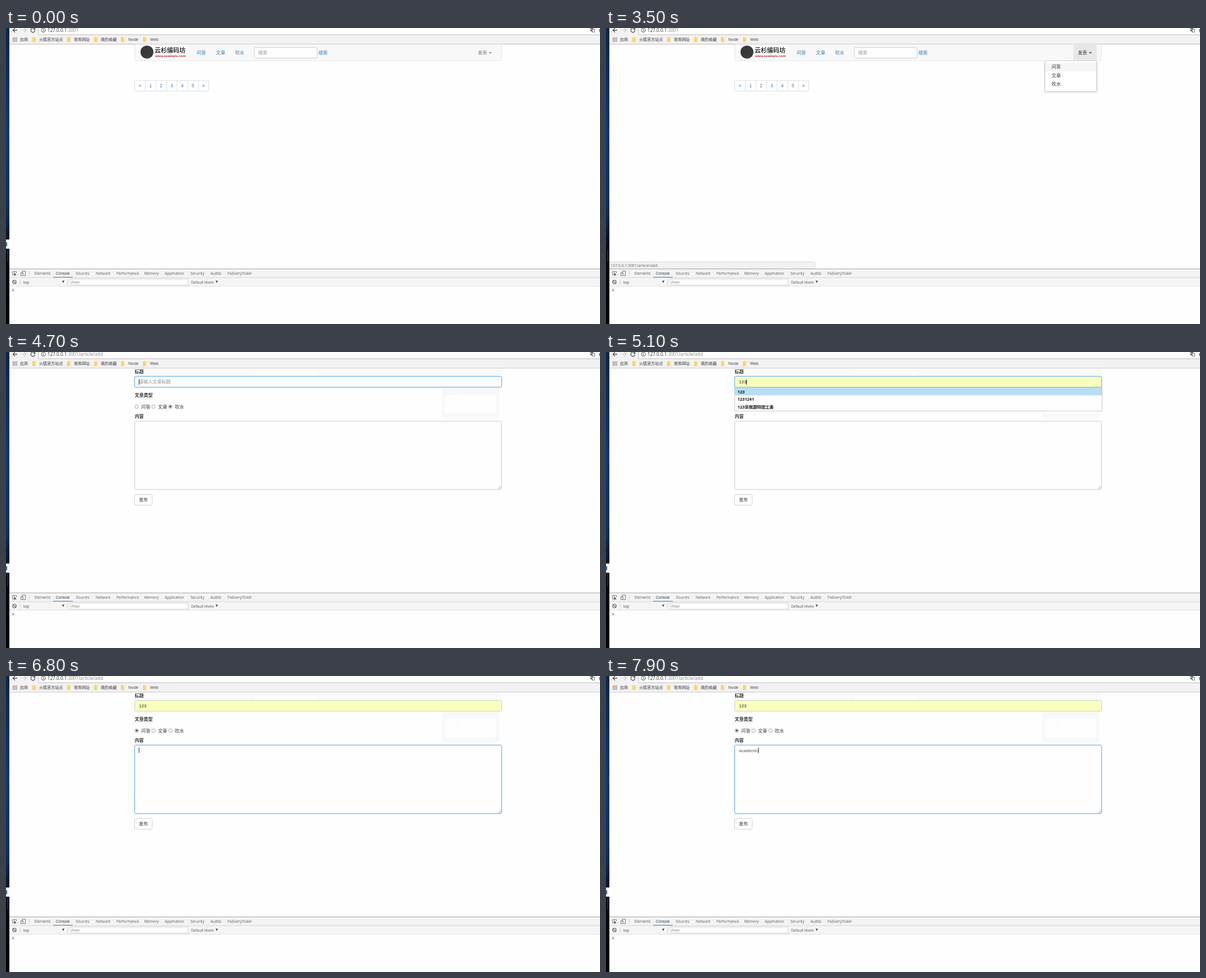
Recreate the animation shown at these times as an HTML page. Size 1059 by 529 pixels, loop 8000 ms.

```html
<!DOCTYPE html>
<html lang="zh">
<head>
<meta charset="utf-8">
<title>Article form</title>
<style>
html, body { margin: 0; width: 100%; height: 100%; overflow: hidden; background: #fefefe; }
svg { display: block; width: 1059px; height: 529px; }
text { white-space: pre; }
.ui { font-family: "Open Sans", "Noto Sans CJK SC", sans-serif; }
.pg { font-family: "Liberation Sans", "Noto Sans CJK SC", sans-serif; }
</style>
</head>
<body>
<svg id="stage" viewBox="0 0 1059 529" xmlns="http://www.w3.org/2000/svg"></svg>
<script>
const LOOP = 8000;
const LINK = '#337ab7', INK = '#333', FOCUS = '#66afe9';

const rect = (x, y, w, h, fill, more = '') =>
  `<rect x="${x}" y="${y}" width="${w}" height="${h}" fill="${fill}" ${more}/>`;
const box = (x, y, w, h, fill, stroke, r = 2, id = '') =>
  rect(x, y, w, h, fill, `stroke="${stroke}" rx="${r}" ${id && `id="${id}"`}`);
const path = (d, stroke, more = '') =>
  `<path d="${d}" fill="none" stroke="${stroke}" ${more}/>`;
const shape = (d, fill) => `<path d="${d}" fill="${fill}"/>`;
const group = (id, body) => `<g id="${id}">${body}</g>`;

// Text placed by its left edge and its middle line
function label(cls, x, mid, str, size, fill, more = '') {
  return `<text class="${cls}" x="${x}" y="${(mid + size * 0.36).toFixed(2)}" font-size="${size}" fill="${fill}" ${more}>${str}</text>`;
}
const ui = (...a) => label('ui', ...a);
const pg = (...a) => label('pg', ...a);
const BOLD = 'font-weight="700"';

function desktop() {
  return `<defs><linearGradient id="wall" x1="0" y1="0" x2="0" y2="1">
    <stop offset="0" stop-color="#04264f"/><stop offset=".35" stop-color="#063a78"/>
    <stop offset=".62" stop-color="#05305f"/><stop offset=".74" stop-color="#020a18"/>
    <stop offset="1" stop-color="#000"/></linearGradient></defs>` +
    rect(0, 0, 6, 529, 'url(#wall)') +
    rect(3, 396, 1, 22, '#4a4f58') +
    group('badge', rect(0, 378, 6, 16.5, '#f4f6f8') + rect(0, 383, 2, 7, '#3465a8'));
}

function browser() {
  const marks = [[47, 59, '火狐官方站点'], [109, 121, '常用网址'], [157, 169, '我的收藏'], [205, 218, 'Node'], [244, 257, 'Web']];
  const dots = ['#d9453d', '#4a8f4c', '#3b78e0'];
  let s = rect(6, 0, 1053, 29, '#f2f2f2') +
    rect(58, -4, 1010, 16, '#fff', 'stroke="#b9b9b9" rx="1.5"') +
    path('M20 4H12.5M16 .3L12.3 4L16 7.7', '#555', 'stroke-width="1.3"') +
    path('M28.5 4H36M32.5 .3L36.2 4L32.5 7.7', '#ccc', 'stroke-width="1.2"') +
    path('M51 1.5A3.8 3.8 0 1 0 51.8 4.6', '#555', 'stroke-width="1.3"') +
    shape('M52.2 -.5V3.4H48.3Z', '#555') +
    `<circle cx="66.5" cy="4" r="3.6" fill="none" stroke="#555"/>` +
    rect(66, 3.2, 1, 3, '#555') + rect(66, 1.6, 1, 1, '#555') +
    `<text class="ui" x="74" y="6.9" font-size="8.15" fill="#333">127.0.0.1<tspan fill="#888">:3001<tspan id="route"></tspan></tspan></text>` +
    group('translate', rect(1042, 0, 5, 6, '#666') + rect(1045.5, 2.5, 4, 5, '#fff', 'stroke="#666" stroke-width=".8"') +
      path('M1043.2 4L1044.5 1.5L1045.8 4', '#fff', 'stroke-width=".7"')) +
    shape('M1059 .5L1058 3H1056L1058 5L1057.3 8L1059 7Z', '#777') +
    rect(6, 28.3, 1053, 1, '#c9c9c9');
  for (let i = 0; i < 9; i++)
    s += rect(12 + i % 3 * 2.9, 17 + (i / 3 | 0) * 2.8, 1.8, 1.7, dots[i / 3 | 0]);
  s += ui(25, 20.7, '应用', 7.1, INK);
  for (const [ix, tx, name] of marks)
    s += shape(`M${ix} 16.5H${ix + 5}L${ix + 7} 18.2V25H${ix}Z`, '#f6d568') +
      rect(ix + 5, 18, 2, 7, '#fbe9a6') + ui(tx, 20.7, name, 7.1, INK);
  return s;
}

function home() {
  let s = rect(229.5, 27, 654, 31.5, '#f8f8f8', 'stroke="#e7e7e7" rx="2"') +
    rect(6, 26, 1053, 2.3, '#f2f2f2') + rect(6, 28.3, 1053, 1, '#c9c9c9') +
    rect(238, 31, 86, 24, '#fdfdfd') +
    `<circle cx="251.3" cy="43" r="11.6" fill="#3a3a3a"/>` +
    pg(265, 40.5, '云杉编码坊', 11, INK, BOLD) +
    pg(266, 50, 'www.example.com', 6.1, '#c0282d', BOLD) +
    pg(340, 44, '问答', 8.2, LINK) + pg(374.5, 44, '文章', 8.2, LINK) + pg(408.5, 44, '吹水', 8.2, LINK) +
    box(442.5, 34.8, 112, 19, '#fff', '#ccc') +
    pg(449.5, 44.3, '搜索', 8.2, '#999') + pg(557, 43.8, '搜索', 8.2, LINK) +
    group('menuBg', rect(833, 30, 42, 28, '#e7e7e7')) +
    `<g id="post" fill="#777">${pg(841.3, 44.3, '发表', 8.2, 'inherit')}<path d="M861 43.2H866L863.5 45.8Z"/></g>` +
    box(229.5, 93.8, 132, 18.8, '#fff', '#ddd');
  ['«', '1', '2', '3', '4', '5', '»'].forEach((c, i) => {
    const x = 229.5 + i * 18.9;
    if (i) s += rect(x - 0.5, 94, 1, 18.4, '#ddd');
    s += pg(x + 9.3, 103.3, c, 8.2, LINK, 'text-anchor="middle"');
  });
  s += group('menu', rect(780, 60, 98, 57, '#000', 'opacity=".04" rx="4"') +
    rect(781.3, 59, 95, 56, '#000', 'opacity=".05" rx="3"') +
    box(782.5, 58.5, 92, 55, '#fff', '#ccc') +
    group('menuHover', rect(783, 62, 91, 15.3, '#f5f5f5')) +
    ['问答', '文章', '吹水'].map((w, i) => pg(794.5, 69.2 + i * 15.4, w, 8.2, INK)).join(''));
  return s;
}

function radio(i, word) {
  const x = 233 + i * 30;
  return `<circle cx="${x}" cy="97.6" r="3.3" fill="#f6f6f6" stroke="#999" stroke-width=".8"/>
    <circle id="dot${i}" cx="${x}" cy="97.6" r="1.8" fill="#444"/>` + pg(x + 8, 97.6, word, 8.2, INK);
}

function form() {
  return rect(230, 30, 654, 28, '#fafafa') + rect(443, 36, 111, 17, '#fefefe') +
    rect(777.5, 61, 102, 57.5, '#f8f8f8', 'rx="4"') + rect(783, 77, 91, 33, '#fefefe') +
    pg(794.5, 84.6, '文章', 8.2, '#f9f9f9') + pg(794.5, 100, '吹水', 8.2, '#f9f9f9') +
    pg(229.5, 35, '标题', 8, INK, BOLD) +
    box(228.9, 42.9, 655.2, 20.7, 'none', '#cfe5f8', 3, 'titleGlow') +
    box(229.5, 43.7, 654, 19.2, '#fafafa', '#ccc', 2, 'title') +
    group('hint', pg(237, 53.4, '请输入文章标题', 8.1, '#999')) +
    `<text id="typed" class="pg" x="237" y="56.4" font-size="8" fill="#222"></text>` +
    rect(0, 49, 1, 9.5, '#222', 'id="titleCaret"') +
    pg(229.5, 77.4, '文章类型', 8, INK, BOLD) +
    ['问答', '文章', '吹水'].map((w, i) => radio(i, w)).join('') +
    pg(229.5, 114.8, '内容', 8, INK, BOLD) +
    box(228.9, 122.9, 655.2, 123.7, 'none', '#cfe5f8', 3, 'bodyGlow') +
    box(229.5, 123.7, 654, 122, '#fefefe', '#ccc', 2, 'body') +
    path('M878 244.5L882.5 240M880.5 244.5L882.5 242.5', '#888', 'stroke-width=".8"') +
    `<text id="article" class="pg" x="237" y="136" font-size="8.1" fill="#555"></text>` +
    rect(0, 128, 1, 9.5, '#222', 'id="bodyCaret"') +
    box(229.5, 254.8, 31, 19, '#fff', '#ccc') + pg(237, 264.4, '发布', 8.1, INK) +
    '<g id="suggest"></g><g id="ime"></g>';
}

function devtools() {
  const tabs = { 51: 'Elements', 89: 'Console', 124.5: 'Sources', 160: 'Network', 197: 'Performance', 246.5: 'Memory',
    283: 'Application', 329: 'Security', 364.5: 'Audits', 395: 'FixEveryTicket' };
  let s = rect(6, 430, 1053, 99, '#fefefe') + rect(6, 430, 1053, 16, '#f3f3f3') + rect(6, 430, 1053, 1, '#a8a8a8') +
    rect(6, 446, 1053, 15, '#f5f5f5') + rect(6, 445.7, 1053, .8, '#ccc') + rect(6, 461, 1053, .8, '#d8d8d8') +
    path('M18.5 438V435.3H11.8V441.5H14', '#666', 'stroke-width=".9"') + shape('M14.2 437L19 441.5L16.5 441.4L15 443.5Z', '#444') +
    path('M29 437.5V434.3H34.5V442.5H31.5', '#666', 'stroke-width=".9"') +
    rect(26.7, 437.5, 3.6, 5, 'none', 'stroke="#666" stroke-width=".9"') +
    rect(41, 434, .8, 9, '#ccc') + rect(84, 444.8, 35, 1.2, '#4a8fe0') +
    `<circle cx="15" cy="454" r="3.2" fill="none" stroke="#555" stroke-width="1.1"/>` + path('M12.8 451.8L17.2 456.2', '#555', 'stroke-width="1.1"') +
    rect(25, 449, .8, 10, '#ccc') + ui(31, 454.3, 'top', 6.6, '#444') + shape('M99.8 451.5H104.2L102 455.8Z', '#555') +
    rect(109, 449, .8, 10, '#ccc') + box(114.5, 448.5, 210, 11, '#fff', '#d0d0d0', 0) +
    ui(116.5, 454.3, 'Filter', 6.6, '#777') + ui(330, 454.3, 'Default levels', 6.5, '#555') +
    shape('M373.5 451.5H378L375.7 455.8Z', '#555') +
    path('M11.3 466.3L13.5 468.5L11.3 470.7', '#3879d9', 'stroke-width="1.1"');
  for (const x in tabs) s += ui(+x, 438.8, tabs[x], 6.6, tabs[x] === 'Console' ? '#222' : '#5a5a5a');
  return s;
}

const status = () => group('status', shape('M6 430V417.8H370.5Q372.5 417.8 372.5 420V430Z', '#f1f1f1') +
  path('M6 417.8H370.5Q372.5 417.8 372.5 420V430', '#cfcfcf', 'stroke-width=".8"') +
  ui(8, 424.3, '127.0.0.1:3001/<tspan id="target"></tspan>', 6.9, '#666'));

document.getElementById('stage').innerHTML = rect(0, 0, 1059, 529, '#fefefe') +
  browser() + group('home', home()) + group('form', form()) + status() + devtools() + desktop();

const $ = {};
document.querySelectorAll('[id]').forEach(el => $[el.id] = el);
const show = (el, on) => el.setAttribute('visibility', on ? 'inherit' : 'hidden');
const set = (el, name, v) => el.setAttribute(name, v);

function suggestions(words, marked) {
  if (!words.length) return '';
  let s = box(229.5, 63.5, 655, words.length * 13.8 + .5, '#fefefe', '#c8c8c8', 0);
  if (marked) s += rect(230, 64, 654, 13.5, '#b9ddf3');
  return s + words.map((w, i) => ui(234.5, 70.9 + i * 13.7, w, 7.4, '#111', BOLD)).join('');
}

function candidates(code) {
  if (!code) return '';
  const w = code.length > 4 ? 200 : 209;
  const words = ['academic', 'academy', 'academia', 'academe', 'academics'];
  return box(237.5, 140, w - .5, 103, '#fefefe', '#d5d5d5', 0) +
    ui(243, 149, code, 8.5, INK) + `<circle cx="${w + 221}" cy="149" r="5" fill="#f26a2e"/>` +
    rect(243, 158, w - 12, .8, '#e3e3e3') +
    words.map((c, i) => ui(243, 168 + i * 16, `${i + 1}. ${c}`, 8.5, i ? INK : '#d4502a')).join('');
}

const steps = (t, list) => list.reduce((v, [at, val]) => t >= at ? val : v, '');
const within = (t, a, b) => t >= a && t < b;

function draw(now) {
  const t = Math.floor(now % LOOP / 100) * 100;
  const added = t >= 3800;
  const titleOn = within(t, 4600, 6300), bodyOn = t >= 6700;
  show($.badge, t < 1400 || titleOn || bodyOn);
  show($.home, !added);
  show($.form, added);
  show($.translate, t !== 3800);
  $.route.textContent = added ? '/article/add' : '';

  set($.post, 'fill', t >= 2500 ? INK : '#777');
  show($.menu, !added && t >= 3100);
  show($.menuBg, !added && t >= 3100);
  show($.menuHover, !added && t >= 3500);
  show($.status, within(t, 2900, 4200));
  set($.status, 'opacity', t < 4000 ? 1 : (4200 - t) / 300);
  $.target.textContent = t < 3500 ? '#' : 'article/add';

  const typed = steps(t, [[4800, '1'], [4900, '123']]);
  const picked = t >= 5100;
  $.typed.textContent = typed;
  show($.hint, added && !typed);
  set($.title, 'fill', picked ? '#faffbd' : '#fafafa');
  set($.title, 'stroke', titleOn ? FOCUS : '#ccc');
  show($.titleGlow, titleOn);
  set($.titleCaret, 'x', 236.7 + typed.length * 4.45);
  show($.titleCaret, within(t, 4700, 5500) || within(t, 5600, 6100));
  const words = ['123', '1231241', '123亲我跟特团工委'];
  const more = ['1', '12', '1241241241241241241241'];
  $.suggest.innerHTML = suggestions(
    t === 4800 ? words.concat(more) : within(t, 4900, 5500) ? words : [], picked);

  const pick = t >= 6400 ? 0 : 2;
  for (let i = 0; i < 3; i++) show($['dot' + i], added && i === pick);

  const done = t >= 7900;
  set($.body, 'stroke', bodyOn ? FOCUS : '#ccc');
  show($.bodyGlow, bodyOn);
  $.article.textContent = done ? 'academic' : '';
  set($.bodyCaret, 'x', done ? 271.4 : 236.7);
  show($.bodyCaret, t >= 6800);
  $.ime.innerHTML = candidates(steps(t, [[7000, 'a'], [7100, 'ac'], [7200, 'acad'], [7300, 'acade'],
    [7700, 'academi'], [7800, 'academic'], [7900, '']]));
}

const start = performance.now();
function tick() {
  draw(performance.now() - start);
  requestAnimationFrame(tick);
}
tick();
</script>
</body>
</html>
```
